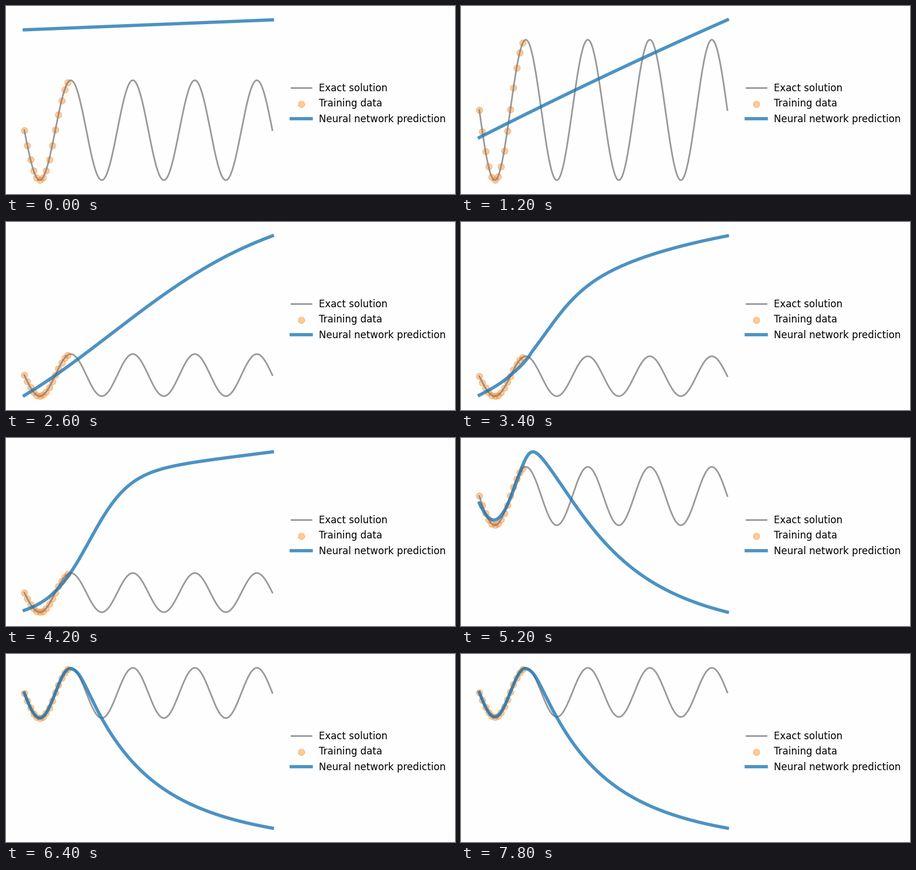
These frames come from a looping animation (765 px wide and 322 px high, 8 s). A matplotlib script:

```python
import numpy as np
import matplotlib.pyplot as plt
from matplotlib.animation import FuncAnimation

W, H, DPI = 765, 322, 100
FRAMES, STEP = 40, 200
plt.rcParams["font.family"] = "DejaVu Sans"


def sigmoid_curve(x, mid, amp, centre, width, slope=0):
    return mid + amp * np.tanh((x - centre) / width) + slope * x


def hump(x, mid, amp, rate, trough, floor, poly, soft):
    """A cosine dip rising to a crest, then a rational decay to floor."""
    rise = mid - amp * np.cos(np.minimum(rate * (x - trough), np.pi))
    decay = floor + 1 / np.polyval(poly, x)
    return -soft * np.logaddexp(-rise / soft, -decay / soft)  # smooth minimum


def monotone_slopes(times, rows):
    """Tangents in time that never overshoot the stages."""
    d = np.diff(rows, axis=0) / np.diff(times)[:, None]
    m = np.empty_like(rows)
    m[0], m[-1] = d[0], d[-1]
    prod, total = d[:-1] * d[1:], d[:-1] + d[1:]
    same = prod > 0
    m[1:-1] = np.where(same, 2 * prod / np.where(same, total, 1), 0)
    return m


# x is counted in periods of the oscillation
x = np.linspace(0, 4, 400)
exact = -np.sin(2 * np.pi * x)
train = slice(0, 75, 5)

# Stages of the fit
u = x / 4
offset = 2.01 + 0.2 * u
tilted = -0.393 + 1.676 * u + 0.12 * u * (1 - u)
bent = sigmoid_curve(x, 1.98, 6.425, 1.41, 2.84)
step = sigmoid_curve(x, 2.23, 3.37, 1.05, 0.63, slope=0.4)
loose = hump(x, 0.95, 1.77, 3.6, 0.235, -5.1, (0.06, -0.054, 0.1487), 0.5)
tight = hump(x, 0, 1, 2 * np.pi, 0.25, -6.4, (0.05, 0.028, 0.0725), 0.35)
final = tight + 0.034 * np.minimum(tight + 1, 0)

times = np.array([0, 1.2, 2.6, 4.2, 5.2, 6.4, 7.8])
stages = np.array([offset, tilted, bent, step, loose, tight, final])
slopes = monotone_slopes(times, stages)


def prediction(t):
    i = np.clip(np.searchsorted(times, t, side="right") - 1, 0, len(times) - 2)
    h = times[i + 1] - times[i]
    s = (t - times[i]) / h
    return ((1 + 2 * s) * (1 - s)**2 * stages[i] + s * (1 - s)**2 * h * slopes[i]
            + s * s * (3 - 2 * s) * stages[i + 1] + s * s * (s - 1) * h * slopes[i + 1])


fig = plt.figure(figsize=(W / DPI, H / DPI), dpi=DPI, facecolor="#fefefe")
ax = fig.add_axes([10 / W, 10 / H, 465 / W, 302 / H])
ax.axis("off")
ax.plot(x, exact, color="grey", lw=2, alpha=0.8, label="Exact solution")
ax.scatter(x[train], exact[train], s=60, color="tab:orange", alpha=0.4,
           label="Training data")
fit, = ax.plot(x, offset, color="tab:blue", lw=4, alpha=0.8,
               label="Neural network prediction")
ax.legend(loc=(1.01, 0.34), frameon=False, fontsize="large")
ax.set_xlim(-0.2, 4.2)


def update(frame):
    y = prediction(frame * STEP / 1000)
    fit.set_ydata(y)
    lo, hi = min(y.min(), -1), max(y.max(), 1)
    pad = 0.05 * (hi - lo)
    ax.set_ylim(lo - pad, hi + pad)
    return fit,


anim = FuncAnimation(fig, update, frames=FRAMES, interval=STEP, repeat=True)
plt.show()
```
